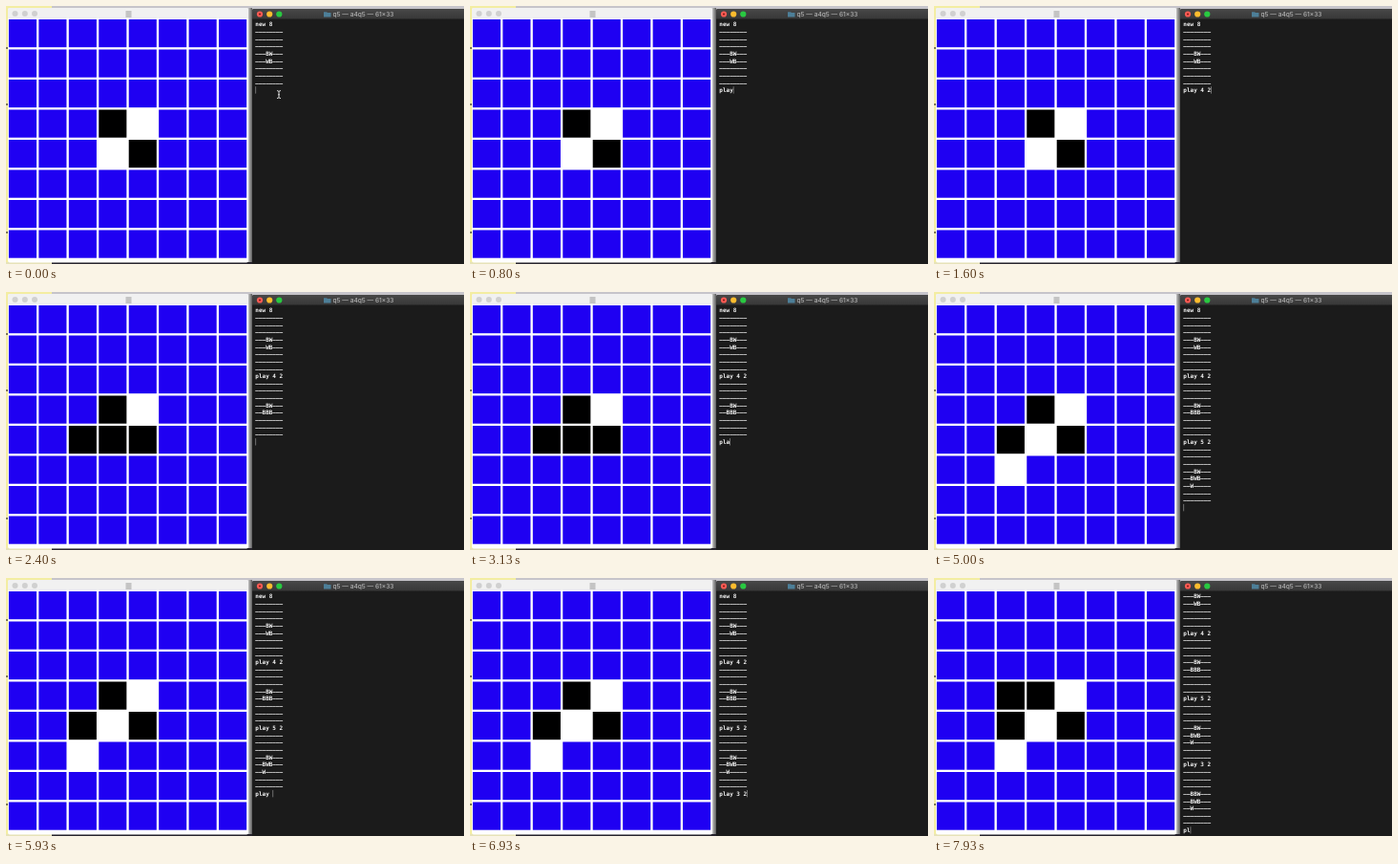
These frames come from a looping animation (480 px wide and 270 px high, 8 s). An HTML page:

```html
<!DOCTYPE html>
<html lang="en">
<head>
<meta charset="utf-8">
<title>Board game in a terminal</title>
<style>
  html, body { margin: 0; width: 100%; height: 100%; overflow: hidden; background: #1b1b1b; }
  svg { display: block; width: 100vw; height: 100vh; }
  .term text { font: bold 6px "DejaVu Sans Mono", monospace; fill: #f4f4f4; white-space: pre; }
  .title { font: 500 6.6px Inter, sans-serif; fill: #b4b4b4; text-anchor: middle; }
</style>
</head>
<body>
<svg viewBox="0 0 480 270" xmlns="http://www.w3.org/2000/svg">
  <defs>
    <linearGradient id="edge">
      <stop offset="0" stop-color="#c4c4c4"/>
      <stop offset="1" stop-color="#5c5c5c"/>
    </linearGradient>
    <linearGradient id="bar" x2="0" y2="1">
      <stop offset="0" stop-color="#484848"/>
      <stop offset="1" stop-color="#383838"/>
    </linearGradient>
    <filter id="soft" filterUnits="userSpaceOnUse" x="0" y="10" width="258" height="260"
            color-interpolation-filters="sRGB">
      <feGaussianBlur stdDeviation=".45"/>
    </filter>
  </defs>

  <!-- desktop behind the windows -->
  <rect width="480" height="270" fill="#c6c4ca"/>
  <path d="M0 0H48V2H3V270H0Z" fill="#f3eda2"/>
  <path d="M0 43h2v2h-2zM0 102h2v2h-2zM0 236h2v2h-2z" fill="#77735a"/>
  <rect y="268" width="48" height="2" fill="#e6e2b8"/>
  <rect x="48" y="268" width="210" height="2" fill="#25222b"/>

  <!-- board window -->
  <rect x="2" y="2" width="252" height="266.5" rx="2" fill="#fff"/>
  <path d="M2 13V4q0-2 2-2H252q2 0 2 2V13Z" fill="#f1f1f1"/>
  <g fill="#d0d0d0">
    <circle cx="9.5" cy="8" r="3"/><circle cx="19.8" cy="8" r="3"/><circle cx="30" cy="8" r="3"/>
  </g>
  <rect x="125.5" y="5" width="6" height="7" fill="#c4c4c4"/>
  <rect x="254" y="2" width="4" height="266" fill="url(#edge)"/>
  <g id="board" filter="url(#soft)"></g>

  <!-- terminal window -->
  <path d="M258 270V5q0-2 2-2H480V270Z" fill="#1b1b1b"/>
  <path d="M258 13.5V5q0-2 2-2H480V13.5Z" fill="url(#bar)"/>
  <circle cx="266" cy="8.5" r="3.1" fill="#fc5b54"/>
  <circle cx="266" cy="8.5" r="1" fill="#7d1613"/>
  <circle cx="276.2" cy="8.5" r="3.1" fill="#fdbc2e"/>
  <circle cx="286.3" cy="8.5" r="3.1" fill="#29c941"/>
  <path d="M333 6.2h3l1 .8h3.5v4.6h-7.5z" fill="#4d7f98"/>
  <text class="title" x="374.5" y="11.2">q5 — a4q5 — 61×33</text>
  <g class="term" id="term"></g>
  <rect id="caret" width=".8" height="7.4" fill="#858585"/>
  <path id="pointer" d="M284 88.6q2 0 2 1.2q0-1.2 2-1.2M286 89.6V95.6M284 96.6q2 0 2-1.2q0 1.2 2 1.2M285 92.8h2"
        fill="none" stroke="#d6d6d6" stroke-width="1"/>
</svg>
<script>
const LOOP = 8000, SIZE = 8, ROWS = 33, LINE = 7.65, CHAR = 3.612, LEFT = 261.3;
const NS = "http://www.w3.org/2000/svg";
const board = document.getElementById("board");
const term = document.getElementById("term");
const caret = document.getElementById("caret");
const pointer = document.getElementById("pointer");

// middle: contents of rows 3 to 5; keys: time of each keystroke
const start = ["---BW---", "---WB---", "--------"];
const turns = [
  { text: "play 4 2", keys: [270, 470, 600, 800, 930, 1130, 1330, 1530], enter: 1870,
    middle: ["---BW---", "--BBB---", "--------"] },
  { text: "play 5 2", keys: [2670, 2870, 3000, 3200, 3470, 4070, 4330, 4470], enter: 4730,
    middle: ["---BW---", "--BWB---", "--W-----"] },
  { text: "play 3 2", keys: [5200, 5330, 5470, 5670, 5800, 6330, 6530, 6670], enter: 7000,
    middle: ["--BBW---", "--BWB---", "--W-----"] },
  { text: "pl", keys: [7730, 7870], enter: Infinity }
];
const colours = { "-": "#1f00f2", B: "#000", W: "#fff" };

function add(parent, tag, attrs) {
  const el = document.createElementNS(NS, tag);
  for (const key in attrs) el.setAttribute(key, attrs[key]);
  return parent.appendChild(el);
}

const fullBoard = middle => {
  const empty = "-".repeat(SIZE);
  return [empty, empty, empty, ...middle, empty, empty];
};

const cells = Array.from({ length: SIZE * SIZE }, (_, i) => add(board, "rect", {
  x: 2.9 + 31.45 * (i % SIZE), y: 14 + 31.5 * Math.floor(i / SIZE), width: 29.1, height: 29.2
}));
const rows = Array.from({ length: ROWS }, (_, i) => add(term, "text", {
  x: LEFT, y: 21.3 + LINE * i
}));

function stateAt(t) {
  let grid = fullBoard(start);
  const lines = ["new 8", ...grid];
  for (const turn of turns) {
    lines.push(turn.text.slice(0, turn.keys.filter(k => k <= t).length));
    if (t < turn.enter) break;
    grid = fullBoard(turn.middle);
    lines.push(...grid);
  }
  return { grid, lines: lines.slice(-ROWS) };
}

let shown = "";
function draw(now) {
  const t = now % LOOP;
  const { grid, lines } = stateAt(t);
  const key = lines.join("\n");
  if (key !== shown) {
    shown = key;
    [...grid.join("")].forEach((c, i) => cells[i].setAttribute("fill", colours[c]));
    // en dashes fill the character cell, so empty squares join into a line
    rows.forEach((row, i) => row.textContent = (lines[i] || "").replaceAll("-", "–"));
    const last = lines.length - 1;
    caret.setAttribute("x", LEFT + lines[last].length * CHAR);
    caret.setAttribute("y", 15.4 + LINE * last);
    pointer.style.display = t < turns[0].keys[0] ? "" : "none";
  }
}

const origin = performance.now();
function tick() {
  draw(performance.now() - origin);
  requestAnimationFrame(tick);
}
tick();
</script>
</body>
</html>
```
